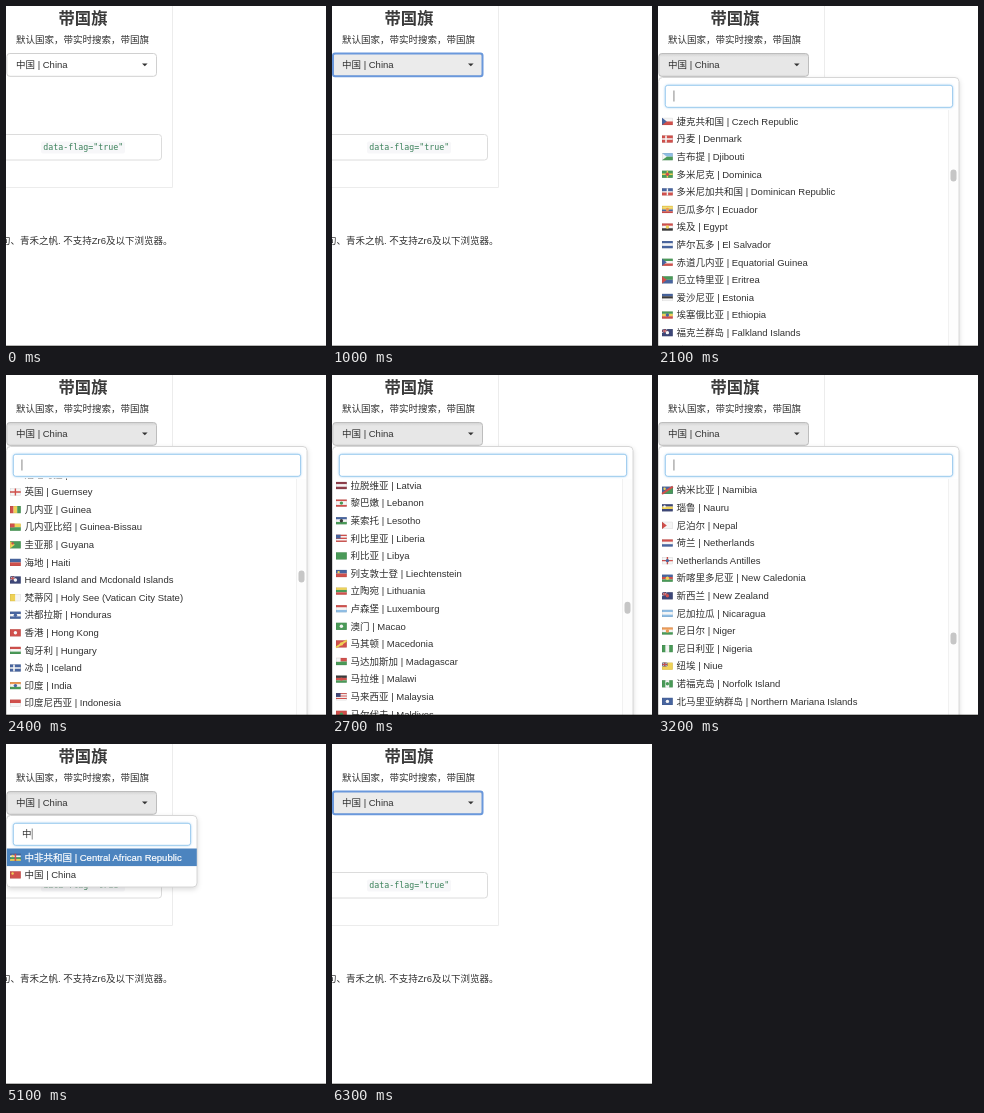
An HTML page for the animation above (6700 ms loop, 320 by 341 pixels).

```html
<!DOCTYPE html>
<html lang="zh-CN">
<head>
<meta charset="utf-8">
<title>Country picker</title>
<style>
html, body { margin: 0; width: 100%; height: 100%; overflow: hidden; background: #fff; }
svg { display: block; width: 100%; height: 100%; }
text { font: 9.5px "Liberation Sans", "Noto Sans CJK SC", "Noto Sans CJK", sans-serif; fill: #303030; white-space: pre; }
.title { font-size: 16.3px; font-weight: 700; text-anchor: middle; fill: #3a3a3a; }
.code { font: 8.3px "DejaVu Sans Mono", monospace; fill: #3a8059; }
.panel { fill: #fff; stroke: #d6d6d6; filter: drop-shadow(0 2px 2.5px rgba(0,0,0,.14)); }
.field { fill: #fff; stroke: #9ccbee; filter: drop-shadow(0 0 1.2px rgba(102,175,233,.5)); }
.mark { fill: #4c84bf; }
.on { fill: #fff; stroke: #fff; stroke-width: .2; }
</style>
</head>
<body>
<svg id="stage" viewBox="0 0 320 341"></svg>
<script>
const LOOP = 6700, PITCH = 17.6, TOP = 104.4;
const COLORS = { r: '#d0504c', g: '#4a9a58', b: '#48659f', w: '#f5f5f5', y: '#efd257', o: '#ec9a55',
  k: '#3a3a3a', l: '#8fbde4', n: '#3d4778', m: '#8f3f4b' };

// flag layers ; label, "/" stands for the divider
const COUNTRIES = `vgry dy;喀麦隆/Cameroon
vrwwr dr;卡塔尔/Canada
hllwlwl sy;佛得角/Cape Verde
hn u dw;开曼群岛/Cayman Islands
hbwgy ir sy;中非共和国/Central African Republic
vbyr;乍得/Chad
hwr qb;智利/Chile
hr sy;中国/China
hg tb dy;科科斯（基林）群岛/科科斯（基林）群岛/Christmas Island
hg u dy;Cocos (Keeling) Islands
hyybr;哥伦比亚/Colombia
hywrb tw;科摩罗/Comoros
hg zr xy;刚果 - 布拉柴维尔/Congo
hl xr sy;刚果民主共和国/Congo, The Democratic Republic of the
hn u dw;库克群岛/Cook Islands
hbwrrwb;哥斯达黎加/Costa Rica
vowg;科特迪瓦/Cote D'Ivoire
hrwb dr;克罗地亚/Croatia
hbwbwb tr;古巴/Cuba
hw do;塞浦路斯/Cyprus
hwr tb;捷克共和国/Czech Republic
hr nw;丹麦/Denmark
hlg tw;吉布提/Djibouti
hg +y dr;多米尼克/Dominica
hbr +w;多米尼加共和国/Dominican Republic
hyybr do;厄瓜多尔/Ecuador
hrwk dy;埃及/Egypt
hbwb;萨尔瓦多/El Salvador
hgwr tb;赤道几内亚/Equatorial Guinea
hgb tr;厄立特里亚/Eritrea
hbkw;爱沙尼亚/Estonia
hgyr db;埃塞俄比亚/Ethiopia
hn u dw;福克兰群岛/Falkland Islands
hw nr;法罗群岛/Faroe Islands
hl u dw;斐济/Fiji
hw nb;芬兰/Finland
vbwr;法国/France
vbwr;法属圭亚那/French Guiana
hrwwr dl;法属波利尼西亚/French Polynesia
vbwr;法属南部领地/French Southern Territories
hgyb;加蓬/Gabon
hrbg;冈比亚/Gambia
hw +r;格鲁吉亚/Georgia
hkry;德国/Germany
hryg dk;加纳/Ghana
hwwr dr;直布罗陀/Gibraltar
hbwbwb qb;希腊/Greece
hwr dr;格陵兰/Greenland
hryg dr;格林纳达/Grenada
vbwr;瓜德罗普岛/Guadeloupe
hn dy;关岛/Guam
vlwl dg;危地马拉/Guatemala
hw +r;英国/Guernsey
vryg;几内亚/Guinea
hyg qr;几内亚比绍/Guinea-Bissau
hg ty sr;圭亚那/Guyana
hbr;海地/Haiti
hn u dw;Heard Island and Mcdonald Islands
vyw;梵蒂冈/Holy See (Vatican City State)
hbwb db;洪都拉斯/Honduras
hr dw;香港/Hong Kong
hrwg;匈牙利/Hungary
hb nw;冰岛/Iceland
howg db;印度/India
hrw;印度尼西亚/Indonesia
hgwr dr;伊朗/Iran, Islamic Republic of
hrwk dg;伊拉克/Iraq
vgwo;爱尔兰/Ireland
hr dw;马恩岛/Isle of Man
hbwwb db;以色列/Israel
vgwr;意大利/Italy
hgkg xy;牙买加/Jamaica
hw dr;日本/Japan
hw xr;泽西岛/Jersey
hkwg tr;约旦/Jordan
hl dy;哈萨克斯坦/Kazakhstan
hkrg dw;肯尼亚/Kenya
hrbw dy;基里巴斯/Kiribati
hbrrb dw;朝鲜/Korea, Democratic People's Republic of
hw dr;韩国/Korea, Republic of
hgwr tk;科威特/Kuwait
hr dy;吉尔吉斯斯坦/Kyrgyzstan
hrbbr dw;老挝/Lao People's Democratic Republic
hmwm;拉脱维亚/Latvia
hrwwr dg;黎巴嫩/Lebanon
hbwg dk;莱索托/Lesotho
hrwrwr qb;利比里亚/Liberia
hg;利比亚/Libya
hbr sy;列支敦士登/Liechtenstein
hygr;立陶宛/Lithuania
hrwl;卢森堡/Luxembourg
hg dw;澳门/Macao
hr xy dy;马其顿/Macedonia
hrg qw;马达加斯加/Madagascar
hkrg dr;马拉维/Malawi
hrwrwrw qn;马来西亚/Malaysia
hr dg;马尔代夫/Maldives
vgyr;马里/Mali
vwr;马耳他/Malta
hb xo sw;马绍尔群岛/Marshall Islands
hb +w;马提尼克岛/Martinique
hg dy;毛里塔尼亚/Mauritania
hrbyg;毛里求斯/Mauritius
hw dr;马约特岛/Mayotte
vgwr do;墨西哥/Mexico
hl dw;密克罗尼西亚/Micronesia, Federated States of
vbyr do;摩尔多瓦/Moldova, Republic of
hrw;摩纳哥/Monaco
vrbr sy;蒙古/Mongolia
hr dy;黑山/Montenegro
hn u dl;蒙特塞拉特/Montserrat
hr dg;摩洛哥/Morocco
hgky tr;莫桑比克/Mozambique
hr qb;缅甸/Myanmar
hb zg xr sy;纳米比亚/Namibia
hnyn sw;瑙鲁/Nauru
hw tr;尼泊尔/Nepal
hrwb;荷兰/Netherlands
hw +r db;Netherlands Antilles
hbrg dy;新喀里多尼亚/New Caledonia
hn u dr;新西兰/New Zealand
hlwl;尼加拉瓜/Nicaragua
howg do;尼日尔/Niger
vgwg;尼日利亚/Nigeria
hy u;纽埃/Niue
vgwg dg;诺福克岛/Norfolk Island
hb dw;北马里亚纳群岛/Northern Mariana Islands`.split('\n').map(line => {
  const [flag, name] = line.split(';');
  return { flag, name: name.replaceAll('/', ' | ') };
});

const rect = (x, y, w, h, attrs) => `<rect x="${x}" y="${y}" width="${w}" height="${h}" ${attrs}/>`;
const text = (x, cy, str, cls = '') => `<text x="${x}" y="${cy + 3.3}" class="${cls}">${str}</text>`;
const path = (d, color, width) => `<path d="${d}" ` +
  (width ? `fill="none" stroke="${color}" stroke-width="${width}"/>` : `fill="${color}"/>`);

function flag(code, x, y) {
  const W = 10.8, H = 7.2;
  const layers = code.split(' ').map(([kind, ...keys]) => {
    const cols = keys.map(k => COLORS[k]), c = cols[0], n = cols.length;
    switch (kind) {
      case 'h': return cols.map((f, i) => rect(0, i * H / n, W, H / n, `fill="${f}"`)).join('');
      case 'v': return cols.map((f, i) => rect(i * W / n, 0, W / n, H, `fill="${f}"`)).join('');
      case 'd': return `<circle cx="5.4" cy="3.6" r="1.7" fill="${c}"/>`;
      case 's': return `<circle cx="2.6" cy="2.2" r="1.2" fill="${c}"/>`;
      case 'q': return rect(0, 0, 4.6, 3.8, `fill="${c}"`);
      case 'i': return rect(4.6, 0, 1.6, H, `fill="${c}"`);
      case 't': return path('M0 0L4.8 3.6L0 7.2Z', c);
      case 'z': return path('M0 7.2H10.8V0Z', c);
      case 'x': return path('M0 7.2L10.8 0', c, 2);
      case '+': return path('M5.4 0V7.2M0 3.6H10.8', c, 1.4);
      case 'n': return path('M4 0V7.2M0 3.6H10.8', c, 1.6);
      case 'u': return rect(0, 0, 5.4, 3.8, `fill="${COLORS.n}"`) +
        path('M0 0L5.4 3.8M0 3.8L5.4 0', '#fff', .7) + path('M2.7 0V3.8M0 1.9H5.4', COLORS.r, .9);
    }
  });
  return `<g transform="translate(${x} ${y - H / 2})">${layers.join('')}` +
    rect(.2, .2, W - .4, H - .4, 'fill="none" stroke="#000" stroke-opacity=".14" stroke-width=".4"') + '</g>';
}

const row = (c, cy, cls) => flag(c.flag, 4, cy) + text(18.5, cy, c.name, cls);
const mark = (cy, w) => rect(.8, cy - 8.8, w, PITCH, 'class="mark"');
const panel = (w, h) => rect(.5, 71.5, w, h, 'rx="4" class="panel"') +
  rect(7.3, 79.3, w - 13.2, 22, 'rx="2.5" class="field"');
const indexOf = name => COUNTRIES.findIndex(c => c.name.endsWith('| ' + name));
const china = indexOf('China'), central = indexOf('Central African Republic');

const button = (id, fill, stroke, extra = '') => `<g id="${id}">` +
  rect(.8, 47.5, 149.7, 22.8, `rx="3" fill="${fill}" stroke="${stroke}"`) + extra + '</g>';

const hitRows = [central, china].map((n, i) => ({ c: COUNTRIES[n], y: 113.3 + i * PITCH }));
const hits = on => `<g id="hits${on}">` + mark(hitRows[on].y, 190) +
  hitRows.map((h, i) => row(h.c, h.y, i === on ? 'on' : '')).join('') + '</g>';

document.getElementById('stage').innerHTML = `
<defs>
  <clipPath id="view">${rect(.5, 103.4, 300, 240, '')}</clipPath>
  <linearGradient id="inset" x2="0" y2="1">
    <stop offset="0" stop-color="#d2d2d2"/><stop offset=".16" stop-color="#e7e7e7"/>
  </linearGradient>
</defs>
${path('M166.5 0V181.5H0', '#ececec', 1)}
${text(77, 14.9, '带国旗', 'title')}
${text(10, 34, '默认国家，带实时搜索，带国旗')}
${rect(-6, 128.5, 161.5, 25.5, 'rx="3" fill="#fff" stroke="#dcdcdc"')}
${rect(35, 135.5, 84, 12, 'rx="2" fill="#f7f7f9"')}
${text(37.3, 141, 'data-flag="true"', 'code')}
${text(-5, 234.5, '句、青禾之帆. 不支持Zr6及以下浏览器。')}
${button('idle', '#fff', '#d0d0d0')}
${button('focus', '#ebebeb', '#adadad', rect(1, 47.5, 149.5, 22.8, 'rx="2" fill="none" stroke="#6a98dc" stroke-width="2"'))}
${button('open', 'url(#inset)', '#bdbdbd')}
${text(10, 58.8, '中国 | China')}
${path('M136 57.4H141.6L138.8 60.3Z', '#333')}
<g id="full">
  ${panel(300.5, 300)}
  <g clip-path="url(#view)">
    <g id="list">${mark(china * PITCH, 289.5)}${COUNTRIES.map((c, i) => row(c, i * PITCH, i === china ? 'on' : '')).join('')}</g>
    ${rect(290.5, 104, 9.5, 240, 'fill="#fdfdfd"')}${path('M290.5 104V341', '#f1f1f1', 1)}
    ${rect(292.5, 0, 6, 12, 'id="thumb" rx="3" fill="#c6c6c6"')}
  </g>
</g>
<g id="filtered">${panel(190.5, 71.5)}${hits(0)}${hits(1)}${text(16, 90, '中')}</g>
${rect(0, 84.5, .7, 11, 'id="caret" fill="#555"')}
${rect(0, 339.7, 320, 1.3, 'fill="#111"')}`;

const $ = id => document.getElementById(id);
const show = (id, on) => { $(id).style.display = on ? '' : 'none'; };

// time, first visible row, speed in rows per ms
const SCROLL = [
  [1900, 0, .085],
  [2400, indexOf('Guernsey') - .716, .1],
  [3200, indexOf('Namibia') - .614, 0]
];

function scrollAt(t) {
  if (t <= SCROLL[0][0]) return 0;
  if (t >= SCROLL[2][0]) return SCROLL[2][1];
  const i = t < SCROLL[1][0] ? 0 : 1;
  const [t0, p0, v0] = SCROLL[i], [t1, p1, v1] = SCROLL[i + 1];
  const d = t1 - t0, u = (t - t0) / d, w = 1 - u;
  return w * w * (1 + 2 * u) * p0 + u * u * (3 - 2 * u) * p1 + d * u * w * (w * v0 - u * v1);
}

function draw(now) {
  const t = Math.floor(now % LOOP / 100) * 100;
  const within = (a, b) => t >= a && t < b;
  const opened = within(1200, 5800), filtered = within(4600, 5800);
  const s = scrollAt(t);
  show('idle', t < 1000);
  show('focus', t >= 1000 && !opened);
  show('open', opened);
  show('full', opened && !filtered);
  show('filtered', filtered);
  show('hits0', t < 5300);
  show('hits1', t >= 5300);
  show('caret', opened && t % 1000 < 500);
  $('caret').setAttribute('x', filtered ? 25.8 : 15.6);
  $('list').setAttribute('transform', `translate(0 ${TOP - s * PITCH})`);
  $('thumb').setAttribute('y', 144.2 + s);
}

const start = performance.now();
function tick() {
  draw(performance.now() - start);
  requestAnimationFrame(tick);
}
tick();
</script>
</body>
</html>
```
